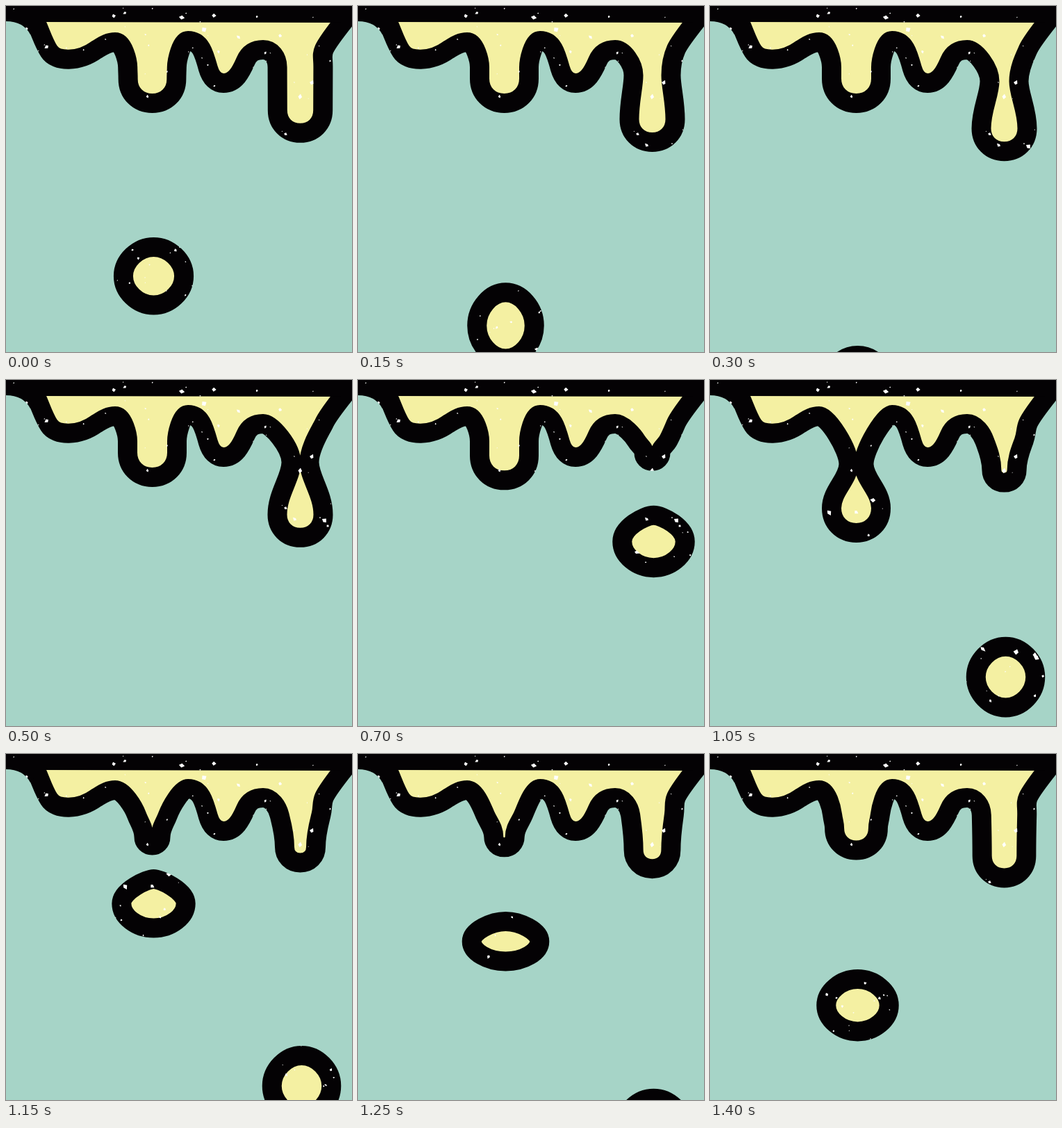
An HTML page with a canvas for the animation above (1.45 s loop, 498 px wide and 498 px high).

```html
<!DOCTYPE html>
<html lang="en">
<head>
<meta charset="utf-8">
<title>Dripping paint</title>
<style>
  html, body { margin: 0; height: 100%; overflow: hidden; background: #a6d4c7; }
  canvas { display: block; }
</style>
</head>
<body>
<canvas id="stage" width="498" height="498"></canvas>
<script>
const ctx = document.getElementById('stage').getContext('2d');
const SIZE = 498, LOOP = 1450, STEP = 50;
const BLACK = '#040204', YELLOW = '#f4f0a2';

const ramp = (t, from, to) => Math.min(1, Math.max(0, (t - from) / (to - from)));
const ease = (t, from, to) => { const p = ramp(t, from, to); return p * p * (3 - 2 * p); };

// Age 0 is the moment a drop breaks off; "from" and "to" are the shoulders of the drip.
const left = {
  start: 1100, x: 210.5, from: { x: 157, y: 52 }, to: { x: 262, y: 50 }, endPull: [-10, 0],
  full: 35.5, swell: [80, 380], pinch: [1050, 1400],
  bottom: age => 130 + 10 * ramp(age, 0, 350) + 80 * ramp(age, 1030, 1400),
  dropX: 212.5, dropY: 192.5, wobble: 8
};
const right = {
  start: 600, x: 423.5, from: { x: 370, y: 63 }, to: { x: 458, y: 62 }, endPull: [-4, 9],
  full: 33, swell: [200, 900], pinch: [850, 1400],
  bottom: age => 108 + .088 * age + 14 * (1 - ramp(age, 0, 100)),
  dropX: 425.5, dropY: 184, wobble: 3
};

// The tip swells while it refills, then its neck pinches until the drop lets go.
function addDrip({ x, from, to, endPull, full, swell, pinch, bottom }, age) {
  const grown = ease(age, ...swell), pinched = ramp(age, ...pinch);
  const bulb = 12 + (full - 12) * grown;
  const neck = 22.5 + (full - 22.5) * Math.sqrt(grown) - (full - 11) * pinched;
  const neckY = 88 + 33 * pinched ** .8;
  const tip = bottom(age), bulbY = tip - bulb;
  const tilt = Math.max(0, neck - bulb) / 2.5;
  const rise = (bulbY - from.y) / 6, reach = .4 * (bulbY - neckY), k = .58 * bulb;
  const xl = x - neck, xr = x + neck, bl = x - bulb, br = x + bulb;

  ctx.bezierCurveTo(from.x + 12, from.y, xl - tilt, neckY - rise, xl, neckY);
  ctx.bezierCurveTo(xl + tilt, neckY + rise, bl, bulbY - reach, bl, bulbY);
  ctx.bezierCurveTo(bl, bulbY + k, x - k, tip, x, tip);
  ctx.bezierCurveTo(x + k, tip, br, bulbY + k, br, bulbY);
  ctx.bezierCurveTo(br, bulbY - reach, xr - tilt, neckY + rise, xr, neckY);
  ctx.bezierCurveTo(xr + tilt, neckY - rise, to.x + endPull[0], to.y + endPull[1], to.x, to.y);
}

function paint() {
  ctx.fillStyle = YELLOW;
  ctx.fill();
  ctx.stroke();
}

function drawBand(leftAge, rightAge) {
  ctx.beginPath();
  ctx.moveTo(36, 10);
  ctx.bezierCurveTo(48, 30, 52, 50, 62, 65);
  ctx.bezierCurveTo(72, 81, 105, 81, 130, 63);
  ctx.bezierCurveTo(140, 57, 147, 52, 157, 52);
  addDrip(left, leftAge);
  ctx.bezierCurveTo(280, 50, 285, 68, 291, 90);
  ctx.bezierCurveTo(295, 104, 303, 111, 313, 111);
  ctx.bezierCurveTo(330, 111, 338, 95, 345, 79);
  ctx.bezierCurveTo(350, 68, 357, 63, 370, 63);
  addDrip(right, rightAge);
  ctx.quadraticCurveTo(463, 51, 490, 17);
  paint();
  ctx.fillStyle = BLACK;
  ctx.fill(new Path2D('M0 0H498V24L50 23L35 41Q25 22 0 22Z'));
}

// A drop falls steadily with a slight surge, wobbling between wide and tall.
function drawDrop({ dropX: x, dropY, wobble }, age) {
  const y = dropY + .545 * age + 6 * Math.sin((age - 210) / 70);
  const squash = wobble * Math.cos((age - 180) / 110) * Math.exp(-age / 400);
  const rx = 43.5 + squash, ry = 42 - 2.5 * squash;
  const crown = rx * (.2 + .32 * ramp(age, 50, 200));
  const kx = .53 * rx, ky = .53 * ry;
  ctx.beginPath();
  ctx.moveTo(x, y - ry);
  ctx.bezierCurveTo(x + crown, y - ry, x + rx, y - ky, x + rx, y);
  ctx.bezierCurveTo(x + rx, y + ky, x + kx, y + ry, x, y + ry);
  ctx.bezierCurveTo(x - kx, y + ry, x - rx, y + ky, x - rx, y);
  ctx.bezierCurveTo(x - rx, y - ky, x - crown, y - ry, x, y - ry);
  ctx.closePath();
  paint();
}

// Worn-print texture: fixed white flecks, seen only where there is paint.
function makeFlecks(count, seed) {
  const random = () => (seed = seed * 16807 % 2147483647) / 2147483647;
  const flecks = new Path2D();
  for (let i = 0; i < count; i++) {
    const x = SIZE * random(), y = SIZE * random();
    const size = 1 + 3.5 * random() ** 3, turn = 6.28 * random();
    for (let corner = 0; corner < 4; corner++) {
      const angle = turn + corner * 1.57, r = size * (.5 + .8 * random());
      const point = [x + r * Math.cos(angle), y + r * Math.sin(angle)];
      corner ? flecks.lineTo(...point) : flecks.moveTo(...point);
    }
    flecks.closePath();
  }
  return flecks;
}
const flecks = makeFlecks(240, 4211);

function drawFlecks() {
  ctx.globalCompositeOperation = 'source-atop';
  ctx.fillStyle = '#fff';
  ctx.fill(flecks);
  ctx.globalCompositeOperation = 'source-over';
}

ctx.lineWidth = 28;
ctx.lineJoin = 'round';
ctx.strokeStyle = BLACK;

function draw(now) {
  const t = Math.floor(now / STEP) * STEP % LOOP;
  const age = side => (t - side.start + LOOP) % LOOP;
  ctx.clearRect(0, 0, SIZE, SIZE);
  drawBand(age(left), age(right));
  drawDrop(left, age(left));
  drawDrop(right, age(right));
  drawFlecks();
}

const began = performance.now();
(function tick() {
  draw(performance.now() - began);
  requestAnimationFrame(tick);
})();
</script>
</body>
</html>
```
